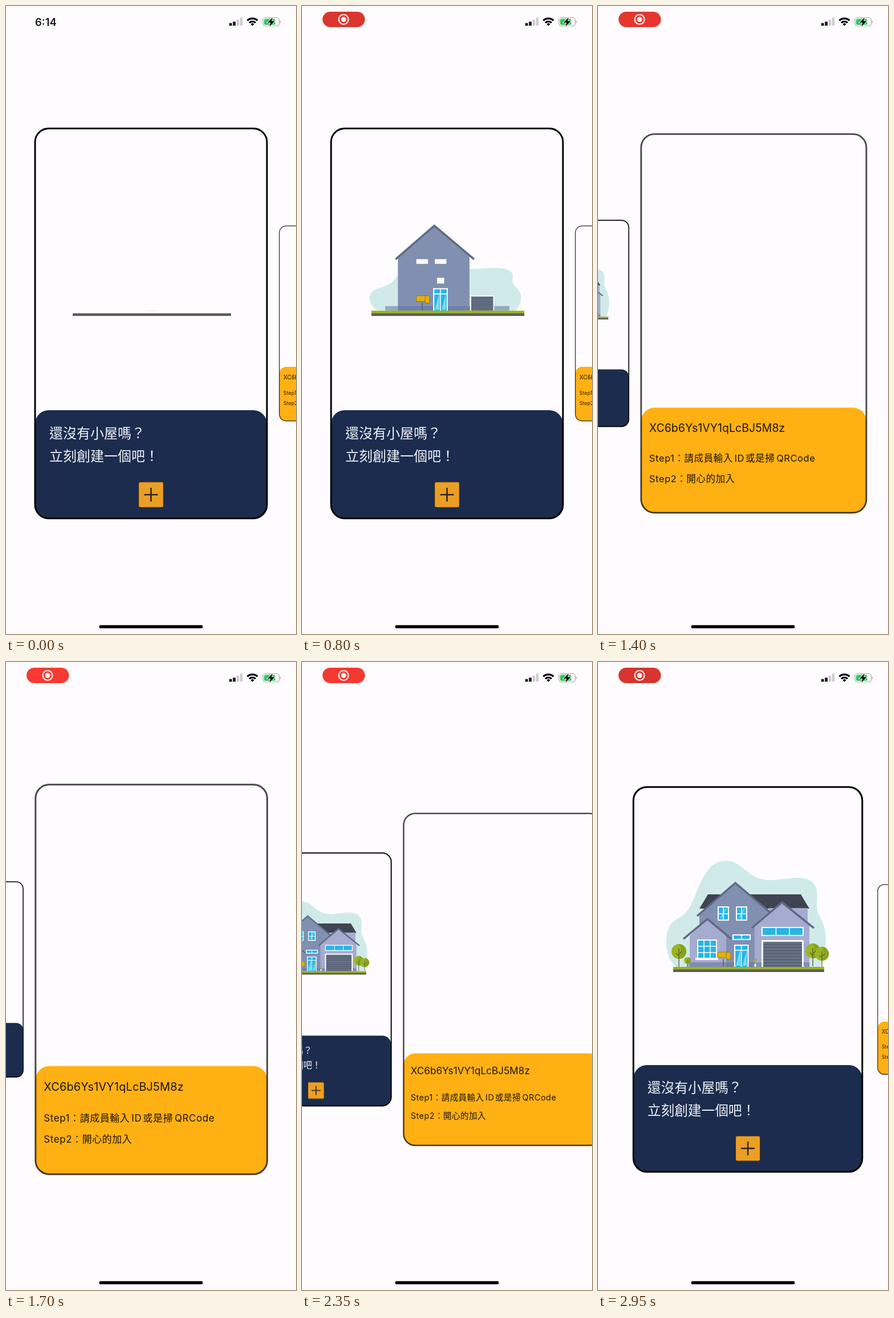
Recreate the animation shown at these times as an HTML page. Size 509 by 1100 pixels, loop 3 s.

```html
<!DOCTYPE html>
<html lang="zh-Hant">
<head>
<meta charset="utf-8">
<title>Card carousel</title>
<style>
  html, body { margin: 0; height: 100%; overflow: hidden; background: #fefcfe; }
  svg { display: block; width: 100vw; height: 100vh; }
  text { font-family: Inter, 'Noto Sans CJK TC', 'Noto Sans CJK', sans-serif; }
  .paper { fill: #fefcfe; }
  .frame { fill: none; stroke: #000; stroke-width: 3; }
  .ask { font-size: 24px; fill: #f1f3f8; }
  .id { font-size: 20px; letter-spacing: .1px; fill: #1d170c; }
  .step { font-size: 17px; letter-spacing: .58px; fill: #1d170c; }
  .edge { fill: none; stroke: #5f6a85; stroke-width: 3.5; }
  .front { fill: #a6abd0; }
  .white { fill: #fff; }
  .glass { fill: #27b5e6; }
  .bars { fill: none; stroke: #fff; stroke-width: 1.5; }
  .leaf { fill: #9ab523; }
  .trunk { fill: none; stroke: #5d5a2a; stroke-width: 1.3; }
</style>
</head>
<body>
<svg viewBox="0 0 509 1100">
  <defs>
    <rect id="sheet" x="51" y="214.5" width="407" height="683" rx="24"/>
    <rect id="panel" x="51" y="708" width="407" height="190" rx="24"/>
    <g id="tree">
      <circle class="leaf" r="13"/>
      <path d="M0-13a13 13 0 0 1 0 26q7-13 0-26" fill="#88a21c"/>
      <path class="trunk" d="M0-5V27M0 8l-5-5M0 5l5-5"/>
    </g>
    <g id="pane">
      <rect class="glass" x="2" y="2" width="16" height="21"/>
      <path d="M4 21l10-18h3L7 21z" fill="#62cdf0"/>
      <path class="bars" d="M10 0v25M0 13h20"/>
    </g>
    <clipPath id="rise"><rect data-pop="192 534 1000 400 y" x="140" y="446" width="104" height="88"/></clipPath>
  </defs>

  <g id="create">
    <use href="#sheet" class="paper"/>
    <g transform="translate(-12 -7.3) scale(1.0132)">
      <path id="blob" fill="#d0eaea" d="M136 534C118 515 116 485 124 466C132 447 150 452 164 424C178 396 188 348 224 348C256 348 262 384 306 382C336 380 352 374 369 381C386 389 386 405 384 422C383 446 400 452 400 486C400 512 392 526 390 534Z"/>
      <path data-pop="275 432 1200 250 y" fill="#3f4352" d="M193 407H356L371 432H178Z"/>
      <rect data-pop="340 534 1150 250 y" class="front" x="300" y="431" width="68" height="103"/>
      <path data-pop="241 534 120 500 y" fill="#8190b1" d="M241 387L302 440V534H178V440Z"/>
      <g id="roof"><path data-pop="241 386 480 250" class="edge" d="M174 445L241 387L310 445"/></g>

      <g data-pop="220 453 676 706 y"><rect class="white" x="210" y="428" width="20" height="25"/></g>
      <g data-pop="252 453 676 706 y"><rect class="white" x="242" y="428" width="20" height="25"/></g>
      <g data-pop="236 453 1200 300 y">
        <use href="#pane" x="210" y="428"/><use href="#pane" x="242" y="428"/>
      </g>

      <path data-pop="323 534 820 280 y" class="front" d="M323 419L371 461V534H275V461Z"/>
      <path data-pop="323 422 1130 220" class="edge" d="M270 466L323 421L379 466"/>
      <g clip-path="url(#rise)">
        <path class="front" d="M192 450L225 480V534H161V480Z"/>
      </g>
      <path data-pop="192 452 1320 220" class="edge" d="M150 485L192 450L234 485"/>
      <rect data-pop="263 534 420 250 x" x="156" y="526" width="215" height="8" fill="#6573a0" opacity=".55"/>

      <g data-pop="191 522 1090 300 y">
        <rect class="white" x="174" y="486" width="35" height="34"/>
        <rect class="glass" x="176" y="488" width="31" height="31"/>
        <path class="bars" d="M186 486v33M197 486v33M174 498h35M174 509h35"/>
        <rect class="white" x="171" y="518" width="40" height="4"/>
      </g>
      <g data-pop="252 482 720 380 x">
        <rect class="white" x="236" y="477" width="32" height="10"/>
        <g data-pop="252 482 920 170 x">
          <rect class="glass" x="238" y="479" width="28" height="6"/>
          <path class="bars" d="M252 477v10"/>
        </g>
      </g>
      <g data-pop="252 534 450 280 y">
        <rect class="white" x="239" y="495" width="25.5" height="39"/>
        <rect class="glass" x="241" y="497" width="21.5" height="37"/>
        <path d="M242 532l8-30v30zM254 532l7-28v28z" fill="#7fd8f3"/>
        <path class="bars" d="M251.7 497v37M239 505h25"/>
      </g>
      <g data-pop="324 480 1080 400 x">
        <rect class="white" x="287" y="464" width="74" height="16"/>
        <g data-pop="324 472 1250 250 x">
          <rect class="glass" x="289" y="466" width="70" height="12"/>
          <path class="bars" d="M312.5 465v14M336 465v14"/>
        </g>
      </g>
      <g data-pop="324 534 680 360">
        <rect class="white" x="287" y="487" width="74" height="47"/>
        <rect x="290" y="490" width="68" height="44" fill="#667187"/>
        <path d="M324 494v40" stroke="#465064" stroke-width="68" stroke-dasharray="1 4.4"/>
      </g>

      <g data-pop="220 534 560 200">
        <path class="trunk" d="M220 520v14"/>
        <path d="M210 518v-6q0-4 4-4h15q4 0 4 4v9h-6l-2-3z" fill="#e0b00c" stroke="#8b7212" stroke-width=".8"/>
        <path d="M225 518v-6q0-4 4-4" fill="none" stroke="#8b7212" stroke-width=".8"/>
      </g>
      <g data-pop="276 534 1450 200">
        <circle class="leaf" cx="276" cy="522" r="2.6"/>
        <path d="M276 523v6M274 529h4l-1 5h-2z" fill="#fff" stroke="#b9c0cf" stroke-width=".6"/>
      </g>
      <g data-pop="142 534 1450 300"><use href="#tree" x="142" y="507"/></g>
      <g data-pop="157 534 1550 300"><use href="#tree" transform="translate(157 523) scale(.46)"/></g>
      <g data-pop="377 534 1550 300"><use href="#tree" x="377" y="506"/></g>
      <g data-pop="393 534 1650 300"><use href="#tree" transform="translate(393 511) scale(.94)"/></g>

      <rect data-pop="264 539 30 150 y" x="132" y="534" width="265" height="5" fill="#98b31d"/>
      <rect id="soil" x="132" y="538.5" width="265" height="4.5" fill="#5e5956"/>
    </g>
    <use href="#panel" fill="#1b2c4e"/>
    <text class="ask" x="76" y="757">還沒有小屋嗎？</text>
    <text class="ask" x="76" y="797">立刻創建一個吧！</text>
    <rect x="232.5" y="833.5" width="44" height="45" rx="3" fill="#eb9f24" stroke="#3b3225" stroke-width="1.5"/>
    <path d="M242.5 856h24M254.5 844v24" stroke="#2a241c" stroke-width="2.5"/>
    <use href="#sheet" class="frame"/>
  </g>

  <g id="join">
    <use href="#sheet" class="paper"/>
    <use href="#panel" fill="#ffb013"/>
    <text class="id" x="65.5" y="751.5">XC6b6Ys1VY1qLcBJ5M8z</text>
    <text class="step" x="65.5" y="805">Step1：請成員輸入<tspan dx="3">ID</tspan><tspan dx="2">或是掃</tspan><tspan dx="3">QRCode</tspan></text>
    <text class="step" x="65.5" y="842">Step2：開心的加入</text>
    <use href="#sheet" class="frame" opacity=".7"/>
  </g>

  <text id="clock" x="51" y="34.5" font-size="18.5" font-weight="600" fill="#1a1a1c">6:14</text>
  <g id="record">
    <rect id="pill" x="36" y="10" width="74.5" height="27" rx="13.5"/>
    <circle cx="73" cy="23.5" r="8.5" fill="none" stroke="#fff" stroke-width="2"/>
    <circle cx="73" cy="23.5" r="4.5" fill="#fff"/>
  </g>
  <path d="M392 30h4.500v4.500h-4.500zM398.400 27.500h4.500v7h-4.500z" fill="#000"/>
  <path d="M404.800 24h4.500v10.500h-4.500zM411 20.500h4v14h-4z" fill="#cdcbce"/>
  <g fill="none" stroke="#000" stroke-width="3.2">
    <path d="M423.5 25.5a13 13 0 0 1 18 0M427 29.4a8 8 0 0 1 11 0"/>
    <path d="M432.5 34.8l-3-3a4.300 4.300 0 0 1 6 0z" fill="#000" stroke="none"/>
  </g>
  <rect x="451" y="20.5" width="28.5" height="14.5" rx="4.5" fill="none" stroke="#a3a2a5" stroke-width="1.2"/>
  <rect x="453" y="22.5" width="19.5" height="10.5" rx="2.8" fill="#37c65b"/>
  <path d="M481 25.500q3 2.300 0 4.600z" fill="#a3a2a5"/>
  <path d="M468 20l-9 9h5.500l-2 7 9-9.500h-5.500z" fill="#000" stroke="#fefcfe" stroke-width="1.5" paint-order="stroke"/>
  <rect x="163.5" y="1084.5" width="182" height="5.5" rx="2.75" fill="#000"/>
</svg>

<script>
const LOOP = 3000;
const $ = id => document.getElementById(id);
const clamp = u => Math.min(1, Math.max(0, u));
const easeOut = u => u * (2 - u);

// Swipe position over time: 0 shows the first card, 1 the second.
const swipe = [[0, 0], [850, 0], [950, .1], [1100, .563], [1200, .77], [1400, .942], [1600, .987],
  [1750, 1], [2100, 1], [2200, .94], [2300, .8], [2400, .6], [2550, .284], [2650, .09],
  [2730, 0], [2760, -.011], [2850, -.024], [2950, -.026], [3000, -.026]];

// Monotone cubic interpolation through the points.
function track(points, t) {
  const secant = i => points[i + 1] ? (points[i + 1][1] - points[i][1]) / (points[i + 1][0] - points[i][0]) : 0;
  const slope = i => {
    const a = i ? secant(i - 1) : 0, b = secant(i);
    return a * b > 0 ? 2 * a * b / (a + b) : 0;
  };
  const i = Math.max(0, points.findIndex(([time]) => time > t) - 1);
  const [t0, v0] = points[i], [t1, v1] = points[i + 1];
  const span = t1 - t0, u = (t - t0) / span, rest = 1 - u;
  return v0 * (1 + 2 * u) * rest * rest + v1 * u * u * (3 - 2 * u)
    + span * u * rest * (slope(i) * rest - slope(i + 1) * u);
}

function scaleAbout(el, x, y, sx, sy) {
  el.setAttribute('transform', `translate(${x} ${y}) scale(${sx} ${sy}) translate(${-x} ${-y})`);
}

function placeCard(el, offset) {
  const scale = 1 - Math.abs(offset) / 2;
  el.setAttribute('transform',
    `translate(${254.5 + 327 * offset} 556) scale(${scale}) translate(-254.5 -556)`);
}

// data-pop: anchor x, anchor y, start, length, axes
const pops = [...document.querySelectorAll('[data-pop]')].map(el => {
  const [x, y, start, length, axes = 'xy'] = el.dataset.pop.split(' ');
  return { el, x: +x, y: +y, start: +start, length: +length, axes };
});

function draw(now) {
  const t = now % LOOP;
  const page = track(swipe, t);
  placeCard($('create'), -page);
  placeCard($('join'), 1 - page);

  for (const { el, x, y, start, length, axes } of pops) {
    const size = easeOut(clamp((t - start) / length));
    scaleAbout(el, x, y, axes.includes('x') ? size : 1, axes.includes('y') ? size : 1);
  }
  scaleAbout($('blob'), 264, 534, 1 - (1 - clamp((t + 40) / 1400)) ** 3, clamp((t + 20) / 1400) ** 1.4);
  scaleAbout($('soil'), 264, 543, 1 + .035 * (1 - clamp(t / 200)), 1);
  const hop = Math.sin(Math.PI * clamp((t - 950) / 350));
  $('roof').setAttribute('transform', `translate(${-3 * hop} ${-17 * hop}) rotate(${-5.5 * hop} 241 387)`);

  const recording = clamp((t - 150) / 200);
  $('clock').setAttribute('opacity', 1 - recording);
  $('record').setAttribute('opacity', recording);
  const glow = Math.cos(Math.PI * t / 1000);
  $('pill').setAttribute('fill', `rgb(${235 + 20 * glow} ${56 + 3 * glow} ${48 + 3 * glow})`);
}

function tick() {
  draw(performance.now());
  requestAnimationFrame(tick);
}
tick();
</script>
</body>
</html>
```
